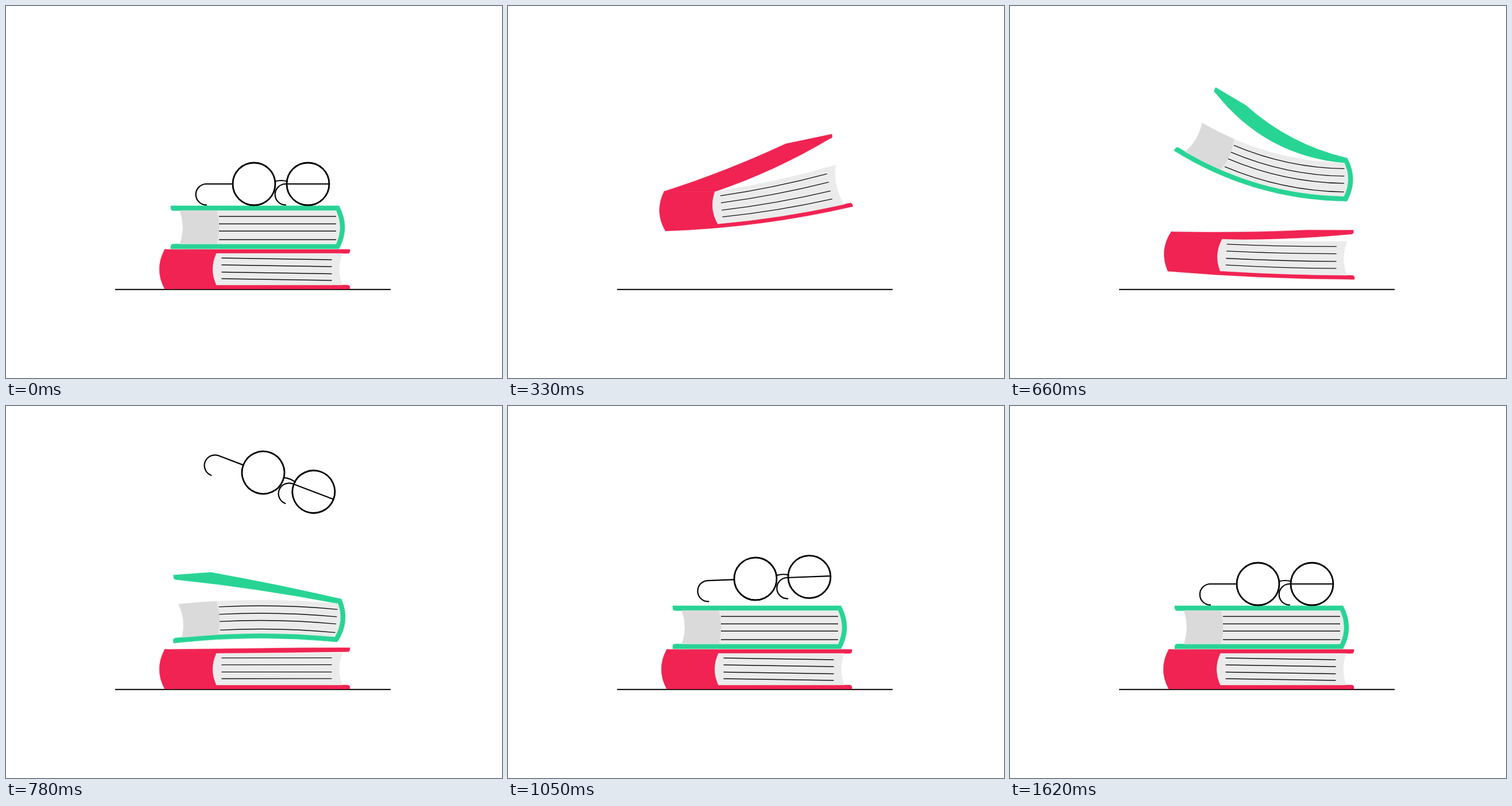
Recreate the animation shown at these times as an HTML page with a canvas. Size 864 by 648 pixels, loop 2460 ms.

```html
<!DOCTYPE html>
<html lang="en">
<head>
<meta charset="utf-8">
<title>Books and glasses</title>
<style>
html, body { margin: 0; width: 100%; height: 100%; overflow: hidden; background: #fff; }
canvas { display: block; width: 864px; height: 648px; }
</style>
</head>
<body>
<canvas id="stage" width="864" height="648"></canvas>
<script>
const ctx = document.getElementById('stage').getContext('2d');
const LOOP = 2460, STEP = 30, RAD = Math.PI / 180;

const linear = u => u;
const easeIn = u => u * u;
const smooth = u => u * u * (3 - 2 * u);

// Sizes are measured from the bottom of the spine: along the book and upwards.
const red = {
  color: '#f02352', side: 1, len: 322.5, height: 69, board: 7,
  pages: [90, 309], text: [99, 291], rows: [54, 42, 29.5, 18],
  fold: .65, flare: 1
};
const green = {
  color: '#28d494', side: -1, len: 293, height: 75, board: 8.5,
  pages: [5, 277], text: [5, 209], rows: [56.5, 43.5, 31, 16],
  fold: .78, flare: 0, shade: 213
};

// Keys: spine foot, tilt and bend of the body, cover opening and curl (degrees),
// slant of the text lines (px). Missing values come from the resting pose.
const redRest = { x: 276.5, y: 493, tilt: 0, bend: 0, open: 0, curl: 0, slant: 3 };
const redTrack = [
  { t: 30, y: 204, slant: 0 },
  { t: 210, y: 310, tilt: 1.8, bend: 1.5, open: 4, slant: 0 },
  { t: 450, x: 272, y: 474, tilt: 13.1, bend: 20.6, open: 30, curl: 2, slant: 0 },
  { t: 540, x: 273, y: 484, tilt: 6, bend: 14, open: 18, slant: 0 },
  { t: 660, x: 275, y: 462, tilt: -2.5, bend: 4.6, open: 4.7, curl: 2, slant: 0, ease: smooth },
  { t: 750, open: .7, slant: 0, ease: easeIn },
  { t: 780, open: .7, slant: 0 },
  { t: 840 }
];
const greenRest = { x: 580, y: 423, tilt: 0, bend: 0, open: 0, curl: 0, slant: 0 };
const greenTrack = [
  { t: 390, x: 565, y: 235, tilt: 5.2, bend: -41, open: .6 },
  { t: 450, x: 565, y: 276, tilt: 5.2, bend: -41, open: .6 },
  { t: 660, x: 587, y: 340, tilt: 16.3, bend: 32, open: 12.4, curl: 17, ease: smooth },
  { t: 780, x: 577, y: 411, tilt: -.4, bend: -12, open: 8.6, curl: 7 },
  { t: 840, ease: easeIn }
];
const glassesRest = { x: 432, y: 310, turn: 0 };
const glassesTrack = [
  { t: 780, x: 448, y: 116, turn: 20.8 },
  { t: 990, x: 434, y: 302, turn: 4.5, ease: u => u * (.55 + .45 * u) },
  { t: 1050, x: 431, y: 301, turn: -2.1 },
  { t: 1110, x: 430.5, y: 298, turn: -3.2, ease: smooth },
  { t: 1240, ease: easeIn },
  { t: 1300, y: 309, turn: -.6, ease: smooth },
  { t: 1380, ease: smooth }
];

function poseAt(track, rest, t) {
  if (t < track[0].t) return null;
  const i = track.findIndex(key => key.t > t);
  if (i < 0) return rest;
  const from = { ...rest, ...track[i - 1] }, to = { ...rest, ...track[i] };
  const u = (to.ease || linear)((t - from.t) / (to.t - from.t));
  const pose = {};
  for (const name in rest) pose[name] = from[name] + (to[name] - from[name]) * u;
  return pose;
}

const mix = (p, q, u) => [p[0] + (q[0] - p[0]) * u, p[1] + (q[1] - p[1]) * u];
const handle = (p, q, k) => [
  (p[0] + q[0]) / 2 - 2 * k * (q[1] - p[1]),
  (p[1] + q[1]) / 2 + 2 * k * (q[0] - p[0])
];
const move = p => ctx.moveTo(...p);
const line = p => ctx.lineTo(...p);
const curve = (p, q, k) => ctx.quadraticCurveTo(...handle(p, q, k), ...q);

// Rounded end of a cover board; returns the point where its inner edge starts.
function boardEnd(from, end, thick) {
  const dx = end[0] - from[0], dy = end[1] - from[1], len = Math.hypot(dx, dy);
  const x = dx / len, y = dy / len;
  const inner = [end[0] - y * thick, end[1] + x * thick];
  const back = [inner[0] - x * 5, inner[1] - y * 5];
  line(mix(end, inner, .45));
  ctx.quadraticCurveTo(...inner, ...back);
  return back;
}

function shape(color, trace) {
  ctx.beginPath();
  trace();
  ctx.closePath();
  ctx.fillStyle = ctx.strokeStyle = color;
  ctx.lineWidth = .5;
  ctx.fill();
  ctx.stroke();
}

// Step along `angle`, then rise at right angles to `lean`.
function offset([x, y], side, along, angle, up, lean) {
  return [
    x + side * (along * Math.cos(angle) - up * Math.sin(lean)),
    y - along * Math.sin(angle) - up * Math.cos(lean)
  ];
}

function drawBook(book, pose) {
  if (!pose) return;
  const { color, side, len, height, board, pages: [near, far], text } = book;
  const tilt = pose.tilt * RAD, bend = pose.bend * RAD, open = pose.open * RAD;
  const stretch = 1 + height * bend / (2 * len);

  // Bend a point of the flat book along an arc.
  const warp = (u, v) => {
    const f = u / len;
    const up = v + book.flare * open * f * f * Math.max(0, v - board);
    return offset([pose.x, pose.y], side, u * stretch,
      tilt + bend * (f - 1) / 2, up, tilt + bend * (f - .5));
  };
  const sag = span => side * bend * span / len / 8;

  const top = warp(0, height), bottom = warp(0, 0), base = warp(len, 0);
  const roof = height - board;
  const a = warp(near, roof), b = warp(far, roof);
  const d = warp(near, board), e = warp(far, board);

  shape(color, () => {
    move(top);
    curve(top, bottom, .135 * side);
    curve(bottom, base, sag(len));
    const from = handle(bottom, base, sag(len));
    curve(boardEnd(from, base, -board * side), d, -sag(len - near));
    line(a);
  });

  // The cover swings around the page corner and thickens as it opens.
  const roll = bend + pose.curl * RAD;
  const reach = (len - near) * (1 - .1 * roll);
  const cover = (f, thick) => offset(a, side, reach * f,
    tilt + open + roll * (f - 1) / 2, thick, tilt + open + roll * (f - .5));
  const fold = cover(book.fold, board + 1.37 * pose.open), tip = cover(1, board);
  shape(color, () => {
    move(top);
    curve(top, fold, side * roll * .075);
    line(tip);
    curve(boardEnd(fold, tip, board * side), a, -side * roll / 8);
  });

  shape('#ebebeb', () => {
    move(a);
    curve(a, d, .115 * side);
    curve(d, e, sag(far - near));
    curve(e, b, -.09 * side);
    curve(b, a, -sag(far - near));
  });

  if (book.shade) {
    const u = warp(book.shade, roof), v = warp(book.shade, board);
    shape('#dadada', () => {
      move(b);
      curve(b, u, -sag(far - book.shade));
      curve(u, v, .07 * side);
      curve(v, e, sag(far - book.shade));
      curve(e, b, -.09 * side);
    });
  }

  ctx.strokeStyle = '#111';
  ctx.lineWidth = 1.3;
  for (const row of book.rows) {
    const p = warp(text[0], row), q = warp(text[1], row - pose.slant);
    ctx.beginPath();
    move(p);
    curve(p, q, sag(text[1] - text[0]));
    ctx.stroke();
  }
}

function drawGlasses(pose) {
  if (!pose) return;
  ctx.save();
  ctx.translate(pose.x, pose.y);
  ctx.rotate(pose.turn * RAD);
  ctx.strokeStyle = '#000';
  ctx.lineCap = 'round';
  for (const [lens, start, ear] of [[0, -37, -83], [94, 131, 55]]) {
    ctx.lineWidth = 2.8;
    ctx.beginPath();
    ctx.arc(lens, 0, 37, 0, 2 * Math.PI);
    ctx.stroke();
    ctx.lineWidth = 2.2;
    ctx.beginPath();
    ctx.moveTo(start, 0);
    ctx.lineTo(ear, 0);
    ctx.arc(ear, 18.3, 18.3, -Math.PI / 2, Math.PI / 2, true);
    ctx.stroke();
  }
  ctx.beginPath();
  ctx.moveTo(37, -4.5);
  ctx.quadraticCurveTo(47, -7.5, 58, -4.5);
  ctx.stroke();
  ctx.restore();
}

function draw(t) {
  ctx.fillStyle = '#fff';
  ctx.fillRect(0, 0, 864, 648);
  ctx.fillStyle = '#000';
  ctx.fillRect(190, 492.8, 480, 2);
  drawBook(red, poseAt(redTrack, redRest, t));
  drawBook(green, poseAt(greenTrack, greenRest, t));
  drawGlasses(poseAt(glassesTrack, glassesRest, t));
}

const begin = performance.now();
function tick() {
  const t = (performance.now() - begin) % LOOP;
  // The finished stack stays up for the first step of each loop.
  draw(t < STEP ? LOOP : Math.floor(t / STEP) * STEP);
  requestAnimationFrame(tick);
}
tick();
</script>
</body>
</html>
```
